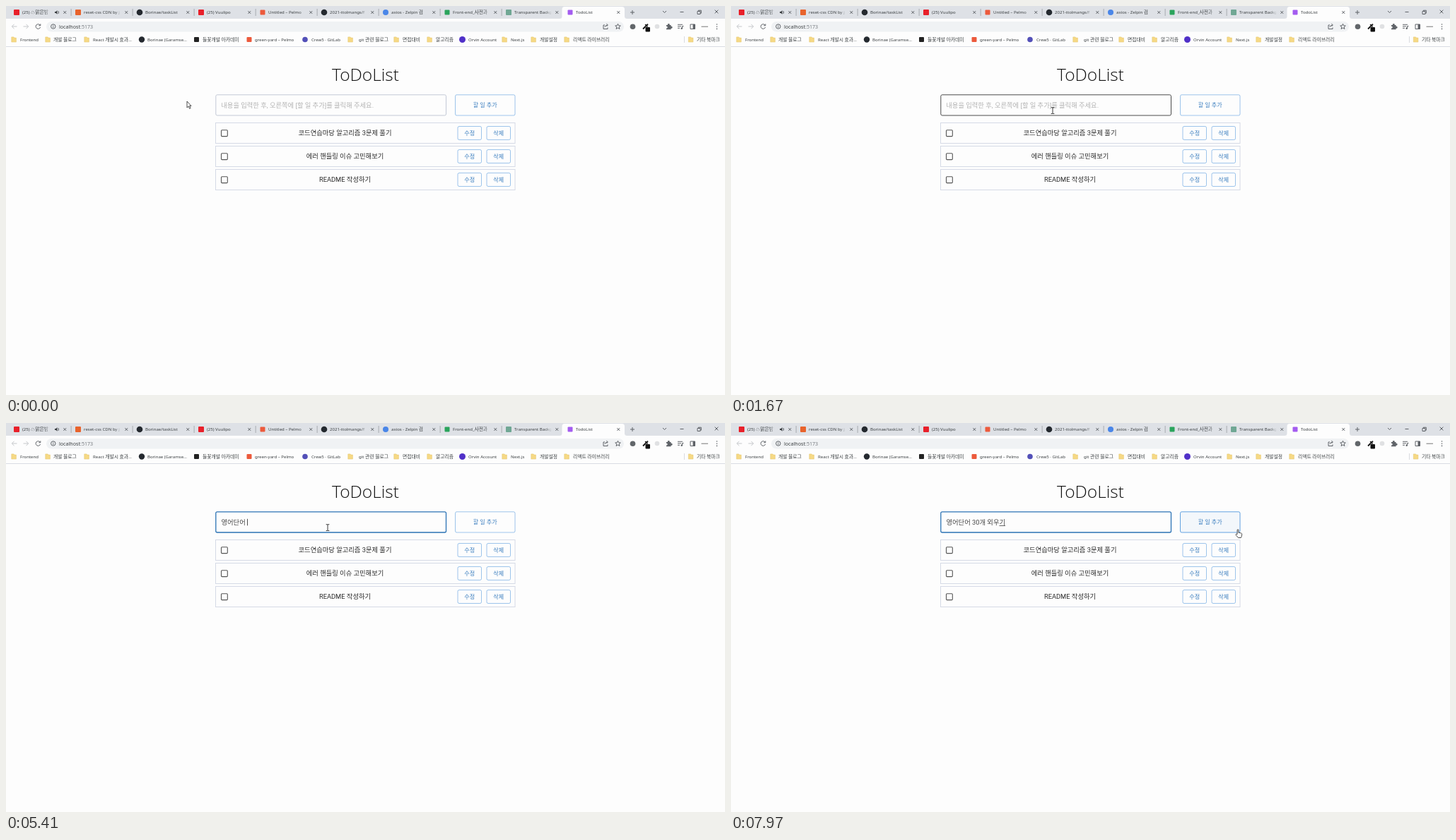
An HTML page that plays this animation: 1017 px wide and 551 px high, repeating every 8 s.

```html
<!DOCTYPE html>
<html lang="ko">
<head>
<meta charset="utf-8">
<title>ToDoList</title>
<style>
  html, body { margin: 0; width: 100%; height: 100%; overflow: hidden; background: #fdfdfd; }
  svg { display: block; width: 100vw; height: 100vh; }
  text { white-space: pre; }
  .chrome { font: 6.05px "Noto Sans", "Noto Sans CJK KR", sans-serif; fill: #3c4043; }
  .chrome tspan.ko { font-size: 6.8px; }
  .app { font: 9.3px Roboto, "Noto Sans CJK KR", sans-serif; fill: #2b2b2b; }
  .heading { font: 300 24.5px "Open Sans", "Noto Sans", sans-serif; fill: #111; }
  .button text { font-size: 8.1px; fill: #3b7ebf; }
  .mid { text-anchor: middle; }
  .line { fill: none; stroke: #5f6368; stroke-width: 1; }
  .pale { stroke: #c4c7ca; }
</style>
</head>
<body>
<svg id="stage" viewBox="0 0 1017 551" preserveAspectRatio="none"></svg>
<script>
const LOOP = 8000;
const stage = document.getElementById('stage');

const rect = (x, y, w, h, fill, extra = '') =>
  `<rect x="${x}" y="${y}" width="${w}" height="${h}" fill="${fill}" ${extra}/>`;
const dot = (x, y, r, fill) => `<circle cx="${x}" cy="${y}" r="${r}" fill="${fill}"/>`;
const block = (x, y, size, fill) => rect(x - size / 2, y - size / 2, size, size, fill, 'rx="1"');
const line = (d, extra = '') => `<path class="line" d="${d}" ${extra}/>`;
const label = (x, y, s, extra = '') => `<text x="${x}" y="${y}" ${extra}>${s}</text>`;
const chromeLabel = (x, y, s) =>
  label(x, y, s.replace(/[가-힣]+/g, k => `<tspan class="ko">${k}</tspan>`));
const cross = (x, y, r) => line(`M${x - r} ${y - r}l${2 * r} ${2 * r}m0 ${-2 * r}l${-2 * r} ${2 * r}`);
const folder = (x, y) =>
  `<path d="M${x - 3.2} ${y - 3.6}h3.2l1 1.2h2.4v6h-6.6z" fill="#f6d985" stroke="#e3c268" stroke-width=".5"/>`;

// Browser frame
const tabs = [
  ['(25) ☁맑은밤', block, 8, '#e8202a'],
  ['reset-css CDN by j', block, 8, '#e8632c'],
  ['Borinae/taskList', dot, 4.3, '#24292f'],
  ['(25) Vuulipo', block, 8, '#e8202a'],
  ['Untitled – Pelmo', block, 7, '#ec5a3c'],
  ['2021-ttolmangs/f', dot, 4.3, '#24292f'],
  ['axios - Zelpin 검', dot, 4, '#4a86e8'],
  ['Front-end_사전과', block, 7, '#2aa45c'],
  ['Transparent Backgr', block, 8, '#70a794'],
  ['TodoList', block, 7, '#a45cf0'],
];

function drawTabs() {
  const active = tabs.length - 1;
  return rect(0, 0, 1017, 18, '#dee1e6') +
    '<path d="M783 18q3.5 0 3.5-3.5V4.500q0-3.500 3.500-3.500h81.500q3.500 0 3.500 3.500v10q0 3.500 3.500 3.500z" fill="#fdfdfd"/>' +
    tabs.map(([name, icon, size, color], i) => {
      const x = 15 + 87 * i, end = i ? 61 : 48;
      const fade = i === active ? '' :
        `<g transform="translate(${x + end - 9} 3)">${rect(0, 0, 9, 12, 'url(#fade)')}${rect(9, 0, 14, 12, '#dee1e6')}</g>`;
      const divider = i < active - 1 ? rect(x + 76.700, 4, .8, 10, '#9a9ea4') : '';
      const mark = (icon === dot ? dot(x, 9, size, color) : block(x, 9, size, color));
      return mark + chromeLabel(x + 8, 11.2, name) + fade + cross(x + 68.3, 9, 1.9) + divider;
    }).join('') +
    '<path d="M69 8h1.500l2-1.800v5.600l-2-1.800H69z" fill="#3c4043"/>' + line('M73.800 7q1.600 2 0 4', 'stroke-width=".8"') +
    line('M886 6v6m-3-3h6') + line('M929 7l2.500 2.500L934 7') + line('M953.500 8.500h5') +
    line('M978 7.500h4v4h-4zm1.300 0V6.200h4v4H982') + cross(1005, 8, 2.400);
}

function drawToolbar() {
  return rect(0, 18, 1017, 39, '#fdfdfd') + rect(57, 22, 817, 14.500, '#f0f2f4', 'rx="7.250"') +
    '<g class="pale">' +
    line('M15.500 29h-7m3-3.200L8.300 29l3.200 3.200', 'style="stroke:#c4c7ca"') +
    line('M24.500 29h7m-3-3.200L31.700 29l-3.200 3.200', 'style="stroke:#c4c7ca"') + '</g>' +
    line('M48.200 27.200A3.300 3.300 0 1 0 48.600 30M48.800 25.400v2.400h-2.400') +
    line('M70 29a3.200 3.200 0 1 1-6.400 0a3.200 3.200 0 1 1 6.400 0M66.800 28.500v2.300M66.800 26.900v.9', 'stroke-width=".8"') +
    label(75, 31.600, 'localhost<tspan fill="#7a7e83">:5173</tspan>', 'font-size="7.1"') +
    line('M847 27h-2v5.500h6v-2M847 30q.5-3 4-3m-1.600-1.800l2 1.800-2 1.800', 'stroke-width=".8"') +
    line('M865.500 25.300l1.100 2.500 2.700.2-2.100 1.800.7 2.700-2.400-1.500-2.400 1.500.7-2.700-2.100-1.800 2.700-.2z', 'stroke-width=".8"') +
    dot(886.500, 29.300, 3.800, '#62666a') +
    line('M901 32.500l4-4m-.8-2.400l3.200 3.200m-1.400-1.600l2-2', 'style="stroke:#111;stroke-width:1.800"') +
    rect(904.500, 30, 6.500, 6.500, '#111', 'rx="1"') + dot(921, 29, 3.300, '#e0e1e3') +
    '<path d="M934 27h2a1.400 1.400 0 1 1 2.600 0h2v2a1.400 1.400 0 1 1 0 2.500v1.800H934v-1.900a1.300 1.300 0 1 0 0-2.500z" fill="#5f6368"/>' +
    line('M950 26.300h7M950 28.800h5M950 31.300h3M956.500 32V28.500h2') + dot(955.700, 31.800, 1.200, '#5f6368') +
    line('M968 26h6.500v6.500H968z') + rect(971.500, 26, 3, 6.500, '#5f6368') +
    rect(983.500, 28.700, 9.500, 1, '#777') + [26, 29.200, 32.400].map(y => dot(1005.500, y, .8, '#5f6368')).join('');
}

const bookmarks = [
  [11, 20, 'Frontend'], [59, 67, '개발 블로그'], [114, 123, 'React 개발시 효과...'],
  [192, 200, 'Borinae (Garamse...', dot(192, 47.500, 4.200, '#24292f')],
  [269.500, 278, '들꽃개발 아카데미', block(269.500, 47.500, 7, '#222')],
  [344, 352, 'green-yard – Pelmo', block(344, 47.500, 7, '#ec5a3c')],
  [423, 432, 'Crew5 · GitLab', dot(423, 47.500, 3.800, '#5350b8')],
  [487, 499, 'git 관련 블로그'], [552, 561, '면접대비'], [599, 608, '알고리즘'],
  [645.500, 654, 'Orvin Account', dot(645.500, 47.500, 4.500, '#5030c8')],
  [705, 714, 'Next.js'], [746, 755, '개발설정'], [793, 802, '리액트 라이브러리'], [968.500, 977, '기타 북마크'],
];

const drawBookmarks = () =>
  bookmarks.map(([ix, tx, name, icon]) => (icon || folder(ix, 47.500)) + chromeLabel(tx, 49.700, name)).join('') +
  rect(959, 43, .8, 9, '#d0d3d7') + rect(0, 57, 1017, 1, '#d9dce3');

// Page
const button = (x, y, w, h, name, id = '') =>
  `<g class="button">${rect(x, y, w, h, 'rgba(25,118,210,0)', `${id} rx="2" stroke="rgba(25,118,210,.42)"`)}` +
  label(x + w / 2, y + h / 2 + 2.900, name, 'class="mid"') + '</g>';

const row = (name, i) => {
  const y = 165.500 + 33 * i;
  return rect(296.500, y, 423.500, 29, 'none', 'stroke="#d5dae6"') +
    rect(304.500, y + 10.300, 8.800, 8.800, 'none', 'rx="1" stroke="#555" stroke-width="1.1"') +
    label(479.500, y + 17.700, name, 'class="mid"') +
    button(639, y + 5, 33.500, 19, '수정') + button(680, y + 5, 33.500, 19, '삭제');
};

const outlined = 'fill="#fff" stroke="#222" stroke-width=".8" stroke-linejoin="round"';
stage.innerHTML =
  `<defs><linearGradient id="fade"><stop stop-color="#dee1e6" stop-opacity="0"/><stop offset="1" stop-color="#dee1e6"/></linearGradient></defs>` +
  rect(0, 0, 1017, 551, '#fdfdfd') +
  `<g class="chrome">${drawTabs()}${drawToolbar()}${drawBookmarks()}</g>` +
  label(508.500, 106, 'ToDoList', 'class="heading mid"') +
  '<g class="app">' +
  rect(296.800, 125.800, 325.700, 29.200, 'none', 'id="field" rx="2"') +
  label(304.300, 143.700, '내용을 입력한 후, 오른쪽에 [할 일 추가]를 클릭해 주세요.', 'id="hint" fill="#b3b3b3"') +
  label(304.500, 143.700, '', 'id="typed" fill="#444"') +
  rect(0, 145, 0, .8, '#444', 'id="underline"') + rect(0, 135.800, .8, 9.500, '#222', 'id="caret"') +
  button(635.500, 125.800, 84.500, 29.200, '할 일 추가', 'id="add"') +
  ['코드연습마당 알고리즘 3문제 풀기', '에러 핸들링 이슈 고민해보기', 'README 작성하기'].map(row).join('') +
  `</g><g id="pointer">
    <path id="arrow" d="M0 0v9l2.100-1.900 1.500 3.300 1.500-.7-1.500-3.200H6z" ${outlined}/>
    <path id="beam" d="M-2.300-4.300h1.700q.6 0 .6.600v7.600q0 .6-.6.600h-1.700M2.300-4.300H.6q-.6 0-.6.600m0 7.600q0 .6.6.600h1.700" fill="none" stroke="#222" stroke-width=".9"/>
    <path id="hand" d="M-.9 6.500V.8q0-1 .9-1t.9 1v3.400l3.600.8q1.300.4 1.200 1.700l-.6 3.100-.8 1.700H.5L-2.900 7.600q-.4-1 .5-1.300z" ${outlined}/>
  </g>`;

// Motion: [ms, x, y]
const route = [
  [0, 256, 135], [500, 730, 133], [870, 730, 133], [1400, 455, 148],
  [7350, 455, 148], [7850, 717, 151], [LOOP, 717, 151],
];
const keys = [
  [0, ''], [3700, 'ㅇ'], [3850, '예'], [4120, '여'], [4260, '영'], [4400, '영ㅇ'], [4520, '영어'],
  [4640, '영얻'], [4760, '영어다'], [4880, '영어단'], [5000, '영어단ㅇ'], [5120, '영어단어'],
  [5250, '영어단어 '], [5560, '영어단어 3'], [5700, '영어단어 30'], [5900, '영어단어 30ㄱ'],
  [6050, '영어단어 30개'], [6230, '영어단어 30개 '], [6350, '영어단어 30개 ㅇ'], [6450, '영어단어 30개 오'],
  [6540, '영어단어 30개 외'], [6640, '영어단어 30개 욍'], [6800, '영어단어 30개 외우'],
  [6940, '영어단어 30개 외욱'], [7080, '영어단어 30개 외우기'],
];
const FOCUS = 2100, BLINK = 530;

function pointerAt(t) {
  const i = Math.max(1, route.findIndex(p => p[0] >= t));
  const [t0, x0, y0] = route[i - 1], [t1, x1, y1] = route[i];
  const u = Math.min(1, Math.max(0, (t - t0) / (t1 - t0))), e = u * u * (3 - 2 * u);
  return [x0 + (x1 - x0) * e, y0 + (y1 - y0) * e];
}
const within = ([x, y], left, right) => x > left && x < right && y > 125 && y < 155;
const overField = p => within(p, 296, 623);
const overAdd = p => within(p, 635, 720);

// Share of the last 250 ms spent over the button, giving the soft hover fade
function hoverAmount(t) {
  let hits = 0;
  for (let k = 0; k < 25; k++) hits += overAdd(pointerAt(Math.max(0, t - k * 10)));
  return hits / 25;
}

const el = id => document.getElementById(id);
const [field, hint, typed, underline, caret, add, pointer] =
  ['field', 'hint', 'typed', 'underline', 'caret', 'add', 'pointer'].map(el);
const set = (node, attrs) => { for (const k in attrs) node.setAttribute(k, attrs[k]); };
const show = (node, on) => node.setAttribute('visibility', on ? 'visible' : 'hidden');

function render(now) {
  const t = now % LOOP;
  const p = pointerAt(t);
  const kind = overField(p) ? 'beam' : overAdd(p) ? 'hand' : 'arrow';
  set(pointer, { transform: `translate(${p[0]} ${p[1]})` });
  for (const id of ['arrow', 'beam', 'hand']) show(el(id), id === kind);

  const focused = t >= FOCUS;
  set(field, {
    stroke: focused ? '#2b73b5' : kind === 'beam' ? '#4a4a4a' : '#c3c9d6',
    'stroke-width': focused ? 1.3 : 1,
  });
  const h = hoverAmount(t);
  set(add, { fill: `rgba(25,118,210,${.045 * h})`, stroke: `rgba(25,118,210,${.42 + .25 * h})` });

  const [keyTime, value] = keys.filter(k => k[0] <= t).pop();
  if (typed.textContent !== value) typed.textContent = value;
  show(hint, !value);
  const width = value ? typed.getComputedTextLength() : 0;
  const composing = /[ㄱ-힣]$/.test(value);
  const last = composing ? typed.getSubStringLength(value.length - 1, 1) : 0;
  set(underline, { x: 304.500 + width - last, width: last });
  set(caret, { x: 304.500 + width });
  show(caret, focused && Math.floor((t - Math.max(keyTime, FOCUS)) / BLINK) % 2 === 0);
}

const start = performance.now();
(function frame() {
  render(performance.now() - start);
  requestAnimationFrame(frame);
})();
</script>
</body>
</html>
```
